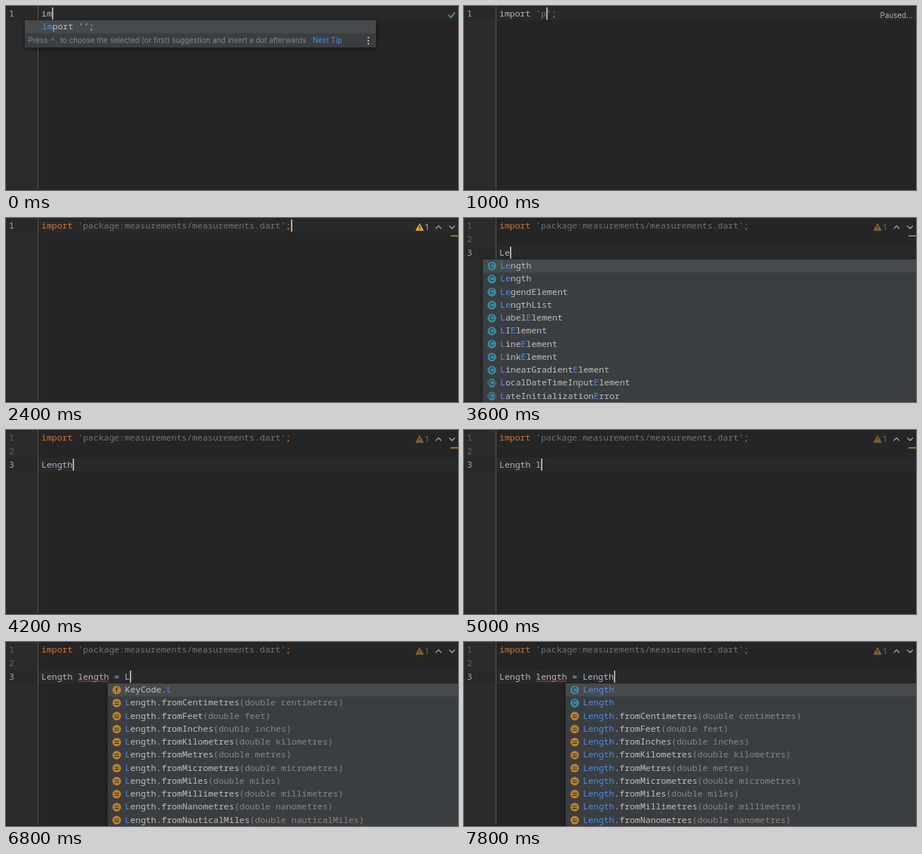
These frames come from a looping animation (600x244 px, 8000 ms). An HTML page:

```html
<!DOCTYPE html>
<html lang="en">
<head>
<meta charset="utf-8">
<title>Code completion</title>
<style>
  html, body { margin: 0; width: 100%; height: 100%; overflow: hidden; background: #262526; }
  svg { display: block; width: 600px; height: 244px; }
  text { font: 11.5px "Noto Sans Mono", "DejaVu Sans Mono", monospace; white-space: pre; }
  .ui { font: 9.8px Inter, Roboto, sans-serif; }
  .icon { font: 600 8.5px Inter, Roboto, sans-serif; text-anchor: middle; }
  .pop { filter: drop-shadow(0 2px 3px rgba(0, 0, 0, .45)); }
  .line { fill: none; stroke-linecap: round; stroke-linejoin: round; }
</style>
</head>
<body>
<svg id="stage" viewBox="0 0 600 244"></svg>
<script>
const stage = document.getElementById('stage');
const CHAR = 6.9, LEFT = 47, LINE = 18, ROW = 17.25, LOOP = 8000;
const C = {
  code: '#a9b7c6', key: '#cc7832', str: '#6a8759', unused: '#727376',
  list: '#bdbfc1', match: '#4a8df0', dim: '#858789', num: '#606366', on: '#a7a8aa'
};

// Drawing helpers
const rect = (x, y, w, h, fill, extra = '') =>
  `<rect x="${x}" y="${y}" width="${w}" height="${h}" fill="${fill}" ${extra}/>`;
const path = (d, color, w = 1) =>
  `<path class="line" d="${d}" stroke="${color}" stroke-width="${w}"/>`;
const runs = (x, y, parts, cls = '') =>
  `<text class="${cls}" x="${x}" y="${y}">` +
  parts.map(([s, fill]) => `<tspan fill="${fill}">${s}</tspan>`).join('') + '</text>';
const ui = (x, y, s, fill = C.dim) => runs(x, y, [[s, fill]], 'ui');

// {braces} mark matched letters, parameters are dimmed
function label(x, y, s) {
  const [name, args] = s.split('(');
  const parts = name.split(/[{}]/).map((p, i) => [p, i % 2 ? C.match : C.list]);
  if (args) parts.push(['(' + args, C.dim]);
  return runs(x, y, parts);
}

function icon(kind, x, y) {
  const isClass = kind === 'c' || kind === 'a';
  let out = `<circle cx="${x}" cy="${y}" r="5.7" fill="${isClass ? '#3c8ba5' : '#b9822f'}"/>`;
  if (kind === '=') return out + path(`M${x - 2.5} ${y - 1.3}h5m-5 2.8h5`, '#3b2f22', 1.2);
  if (kind === 'a') out += path(`M${x - 4} ${y - 5}v10m8 -10v10`, '#3c3f41', 1.1);
  const glyph = kind === 'f' ? 'f' : 'C';
  return out + `<text class="icon" x="${x}" y="${y + 3}" fill="#28353b">${glyph}</text>`;
}

const ctrl = (x, y) => path(`M${x} ${y}l2.8 -3.4l2.8 3.4`, C.dim, .9);
const arrow = (x, y, d) =>
  path(`M${x} ${y - 3.4}v6.8m-2.4 ${d > 0 ? -2.4 : -4.4}l2.4 ${d * 2.4}l2.4 ${-d * 2.4}`, C.dim, .9);
const dots = (x, y) => [-4, 0, 4].map(d => rect(x - 1, y + d - 1, 2, 2, '#b4b6b8')).join('');

// Completion list; each row is its icon letter followed by the label
function popup({ x, y = 55, w = 600, h = 200, rows, pad = 23, foot }) {
  let out = `<g class="pop">${rect(x, y, w, h, '#3b3e40')}</g>` + rect(x, y, w, ROW, '#474a4c');
  rows.forEach((r, i) => {
    const top = y + i * ROW;
    if (r[0] !== ' ') out += icon(r[0], x + 12, top + 8.8);
    out += label(x + pad, top + 12.2, r.slice(1));
  });
  return out + (foot ? foot() : '');
}

const tipDot = () =>
  ui(29.5, 49, 'Press') + ctrl(59, 46) + ui(66, 49, '.') +
  ui(72, 49, 'to choose the selected (or first) suggestion and insert a dot afterwards') +
  ui(407, 49, 'Next Tip', C.match) + dots(481, 46);

const tipMove = () =>
  rect(98, 217.5, 467, 18.5, '#3b3e40') + rect(557, 21, 6, 20, '#5b5d5f') +
  ctrl(103, 227) + arrow(112.5, 227, 1) + ui(119.5, 230, 'and') +
  ctrl(140, 227) + arrow(150, 227, -1) +
  ui(160, 230, 'will move caret down and up in the editor') +
  ui(357, 230, 'Next Tip', C.match) + dots(554, 227);

const packages = typed => popup({
  x: 98, y: 19, w: 467, h: 217, pad: 5, foot: tipMove,
  rows: ['measurements/measurements.dart', 'measurements/', '', '_fe_analyzer_shared/',
    '_fe_analyzer_shared/src/', 'analyzer/', 'analyzer/analyzer.dart', 'analyzer/context/',
    'analyzer/dart/', 'analyzer/diagnostic/', 'analyzer/error/', 'analyzer/exception/']
    .map(s => ` {${typed}}` + ('package:' + s).slice(typed.length))
});

const hit = (s, n) => `{${s.slice(0, n)}}${s.slice(n)}`;
const types = () => popup({ x: 25, rows: ['c{Le}ngth', 'c{Le}ngth', 'c{Le}gendElement',
  'c{Le}ngthList', 'c{L}abel{E}lement', 'c{L}I{E}lement', 'c{L}ine{E}lement',
  'c{L}ink{E}lement', 'c{L}inearGradient{E}lement', 'a{L}ocalDateTimeInput{E}lement',
  'a{L}ateInitialization{E}rror'] });
const lengths = n => popup({ x: 25, h: 3 * ROW,
  rows: ['Length', 'Length', 'LengthList'].map(s => 'c' + hit(s, n)) });
const names = n => popup({ x: 73.5, w: 120, h: 3 * ROW,
  rows: ['length', 'lengthList', 'lengths'].map(s => ' ' + hit(s, n)) });

const units = ['Centimetres', 'Feet', 'Inches', 'Kilometres', 'Metres', 'Micrometres',
  'Miles', 'Millimetres', 'Nanometres', 'NauticalMiles'];
const makers = n => units.map(u =>
  `=${hit('Length', n)}.from${u}(double ${u[0].toLowerCase() + u.slice(1)})`);
const calls = n => popup({ x: 135, rows: n < 2
  ? ['fKeyCode.{L}', ...makers(1)]
  : ['c' + hit('Length', n), 'c' + hit('Length', n), ...makers(n).slice(0, 9)] });

// Status corner
function warning(bright) {
  const y = bright ? '#d6a33c' : '#7d6432';
  return `<path d="M549 7.5l5 9h-10z" fill="${y}" stroke="${y}" stroke-linejoin="round"/>` +
    path('M549 10.5v2.6m0 2v.2', '#2a2828', 1.2) +
    ui(556.5, 15.7, '1', bright ? '#b0b2b4' : '#717375') +
    path('M570.8 13.8l3.4 -3.4l3.4 3.4M588.8 10.6l3.4 3.4l3.4 -3.4', '#b4b6b8', 1.2);
}
const sides = {
  none: () => '',
  ok: () => path('M588 12.3l2.6 2.9l4.8 -6', '#4a9c43', 2),
  paused: () => ui(552.5, 15.5, 'Paused...', '#b0b2b4'),
  warn: () => warning(true),
  dim: () => warning(false)
};

const PACKAGE = 'package:measurements/measurements.dart';
const typing = s => [['import ', C.code], [`'${s}'`, C.str], [';', C.key]];
const done = [['import ', C.key], [`'${PACKAGE}'`, C.unused], [';', C.key]];
const END = 10 + PACKAGE.length;
const body = (text, list) => ({ body: text, col: text.length, list });

// Each step overrides part of the state before it
const steps = [
  [0, { head: [['im', C.code]], body: '', row: 0, col: 2, side: 'ok', stripe: 0, error: 0,
    list: () => popup({ x: 25, y: 19, w: 466, h: 36, rows: [" {im}port '';"], foot: tipDot }) }],
  [200, { head: typing(''), col: 8, list: null }],
  [400, { side: 'none' }],
  [600, { side: 'paused' }],
  [1000, { head: typing('p'), col: 9 }],
  [1200, { list: () => packages('p') }],
  [1400, { head: typing('pa'), col: 10, list: () => packages('pa') }],
  [1600, { head: typing(PACKAGE), col: END - 2, list: null }],
  [1800, { col: END - 1 }],
  [2000, { col: END }],
  [2200, { head: done, side: 'none' }],
  [2400, { side: 'warn', stripe: 1 }],
  [2600, { row: 1, col: 0 }],
  [2800, { row: 2 }],
  [3000, { side: 'dim' }],
  [3400, body('L')],
  [3600, body('Le', types)],
  [3800, body('Len', () => lengths(3))],
  [4000, body('Leng', () => lengths(4))],
  [4200, body('Length')],
  [4400, body('Length ')],
  [4800, body('Length l')],
  [5200, body('Length l', () => names(1))],
  [5400, body('Length le', () => names(2))],
  [5600, body('Length len', () => names(3))],
  [5800, body('Length length')],
  [6000, { ...body('Length length '), stripe: 0 }],
  [6200, { ...body('Length length ='), error: 1 }],
  [6600, body('Length length = L')],
  [6800, { list: () => calls(1) }],
  [7000, body('Length length = Le', () => calls(2))],
  [7200, body('Length length = Len', () => calls(3))],
  [7400, body('Length length = Leng', () => calls(4))],
  [7600, body('Length length = Length', () => calls(4))],
  [7800, { list: () => calls(6) }]
];
let last = {};
const states = steps.map(([, change]) => last = { ...last, ...change });

function draw(s) {
  const top = s.row * LINE + 1;
  let out = rect(0, 0, 600, 244, '#262526') + rect(0, 0, 42, 244, '#2a2b2d') +
    rect(0, top, 600, LINE, '#2a292a') + rect(42, 0, 1, 244, '#535355') +
    rect(0, 243, 600, 1, '#2a1e1d');
  for (let i = 0; i <= s.row; i++)
    out += runs(4, 14 + i * LINE, [[i + 1, i === s.row ? C.on : C.num]]);
  out += runs(LEFT, 14, s.head) + runs(LEFT, 50, [[s.body, C.code]]);
  if (s.error) out += path('M96 53' + 'l2 -2l2 2'.repeat(10), '#c0423c', .9);
  out += rect(LEFT + s.col * CHAR + .3, top + 1, 1.5, 16, '#d2d2d2') + sides[s.side]();
  if (s.stripe) out += path('M590.5 24' + 'l1 -.6l1 .6'.repeat(5), '#c48a2c', 1.4);
  if (s.list) out += s.list();
  stage.innerHTML = out;
}

let shown = -1;
function tick() {
  const t = performance.now() % LOOP;
  let i = steps.length - 1;
  while (steps[i][0] > t) i--;
  if (i !== shown) draw(states[shown = i]);
  requestAnimationFrame(tick);
}
tick();
</script>
</body>
</html>
```
